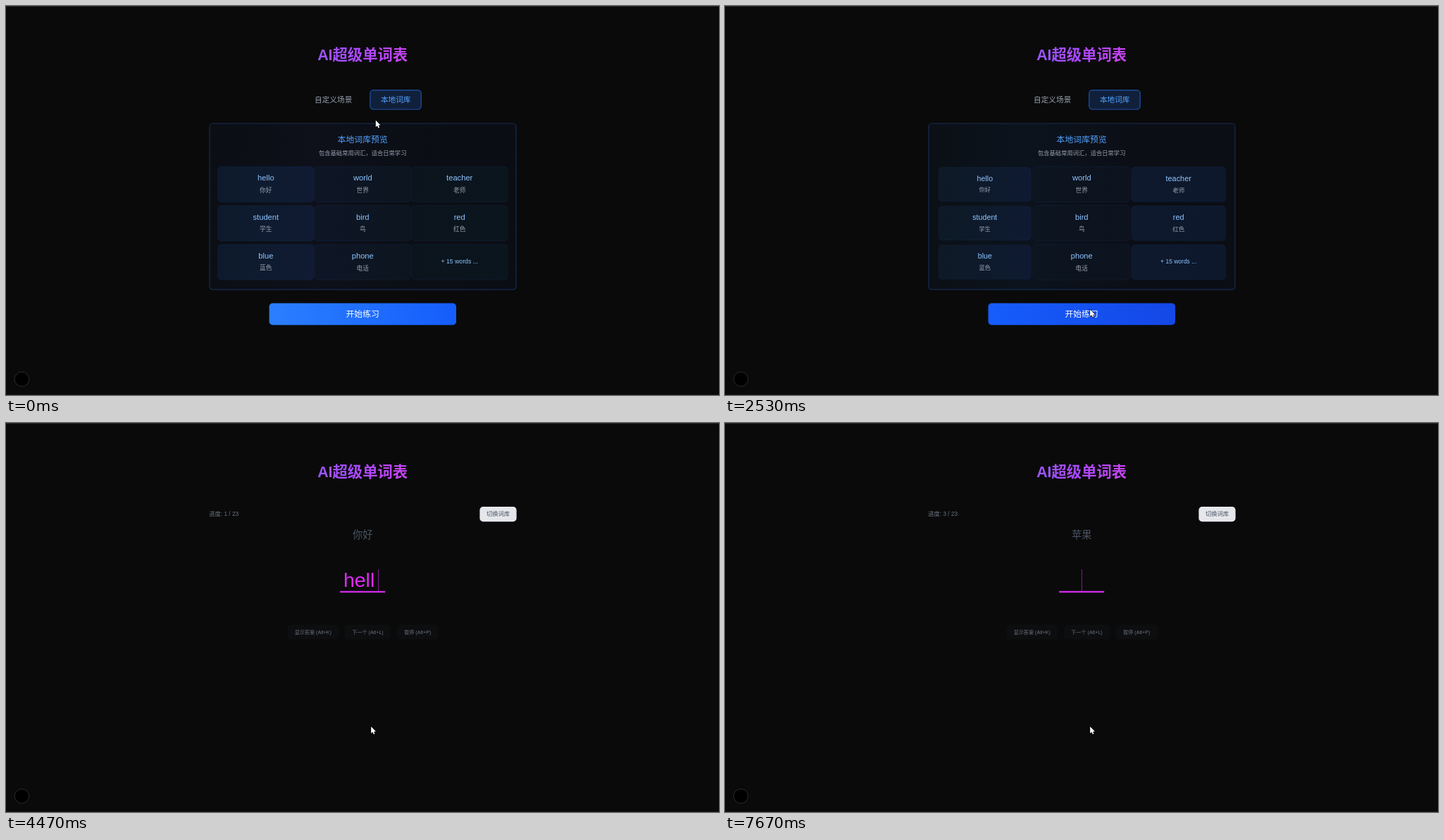
These frames come from a looping animation (1012 by 553 pixels, 8 s). An HTML page with a canvas:

```html
<!DOCTYPE html>
<html lang="zh-CN">
<head>
<meta charset="utf-8">
<title>AI超级单词表</title>
<style>
html, body { margin: 0; width: 100%; height: 100%; overflow: hidden; background: #0a0a0a; }
canvas { display: block; width: 1012px; height: 553px; }
</style>
</head>
<body>
<canvas id="stage"></canvas>
<script>
const W = 1012, H = 553, LOOP = 8000, MID = 506.2;
const FONT = '"Liberation Sans", "Noto Sans CJK SC", "Noto Sans CJK", sans-serif';
const canvas = document.getElementById('stage');
const ctx = canvas.getContext('2d');
const dpr = window.devicePixelRatio || 1;
canvas.width = W * dpr;
canvas.height = H * dpr;

// Rem-based sizes of the page at its zoom level.
const px = n => n * 0.593;
const SM = px(14), MD = px(18), LG = px(20), HUGE = px(48);
const BLUE = '#51a2ff', PALE = '#8ec5ff', GRAY = '#99a1af', DIM = '#6a7282', SLATE = '#4a5565';
const PINK = '#e12afb';

function text(str, x, y, size, color, align = 'center', weight = 400) {
  ctx.font = `${weight} ${size}px ${FONT}`;
  ctx.textAlign = align;
  ctx.fillStyle = color;
  ctx.fillText(str, x, y + size * 0.37);
}

function box(x, y, w, h, r, fill, stroke, line = 1) {
  ctx.beginPath();
  ctx.roundRect(x, y, w, h, r);
  ctx.fillStyle = fill;
  ctx.fill();
  if (stroke) {
    ctx.strokeStyle = stroke;
    ctx.lineWidth = line;
    ctx.stroke();
  }
}

function across(x0, x1, colors) {
  const g = ctx.createLinearGradient(x0, 0, x1, 0);
  colors.forEach((c, i) => g.addColorStop(i / (colors.length - 1), c));
  return g;
}

// Position within a list of key times: index of the segment and progress in it.
function segment(times, t) {
  let i = 0;
  while (i < times.length - 2 && t >= times[i + 1]) i++;
  const k = (t - times[i]) / (times[i + 1] - times[i]);
  return [i, Math.min(1, Math.max(0, k))];
}

const smooth = k => k * k * (3 - 2 * k);

function mix(a, b, k) {
  const part = (c, i) => parseInt(c.slice(i, i + 2), 16);
  return 'rgb(' + [0, 2, 4].map(i => part(a, i) + (part(b, i) - part(a, i)) * k).join(',') + ')';
}

const TINT_TIMES = [0, 1330, 2530];
function tints(keys, t) {
  const [i, k] = segment(TINT_TIMES, t);
  return keys[i].map((c, n) => mix(c, keys[i + 1][n], k));
}

const PANEL = [
  ['0b0e14', '0e101a', '0b0e15', '0b0d14'],
  ['0b1015', '0d1019', '0c0e16', '0c0e15'],
  ['0b1016', '0b131d', '0c0e16', '0c0e15']
];

// Each column breathes with its own period (ms) and lead (ms).
const COLUMNS = [
  { period: 3800, lead: -300, tint: [['0d1a2c', '101b33'], ['0d131f', '0f1a2c'], ['0d1a25', '0f1a32']],
    words: [['hello', '你好'], ['student', '学生'], ['blue', '蓝色']] },
  { period: 2600, lead: 0, tint: [['0e1626', '0c151f'], ['0e1a2d', '0e1a2b'], ['0c141f', '0c131e']],
    words: [['world', '世界'], ['bird', '鸟'], ['phone', '电话']] },
  { period: 3700, lead: 200, tint: [['0b141d', '0b151e'], ['0e1a2a', '0e1a29'], ['0e192d', '0d182c']],
    words: [['teacher', '老师'], ['red', '红色'], ['+ 15 words ...']] }
];

function card(col, row, t) {
  const { period, lead, tint, words } = COLUMNS[col];
  const wave = (1 + Math.cos(2 * Math.PI * (t + lead) / period)) / 2;
  const scale = 1 + 0.05 * wave;
  const [en, zh] = words[row];
  ctx.save();
  ctx.translate(368.8 + col * 137.45, 253.5 + row * 55.3);
  ctx.scale(scale, scale);
  box(-65.2, -24, 130.4, 48, 4.7, across(-65, 65, tints(tint, t)), 'rgba(43,127,255,0.11)', 0.7);
  if (zh) {
    text(en, 0, -8.8, MD, PALE);
    text(zh, 0, 7.8, SM, GRAY);
  } else {
    text(en, 0, -0.8, SM, PALE);
  }
  ctx.restore();
}

const PATH = [[0, 524.8, 162.5], [1330, 521.6, 165.2], [1730, 519.6, 406], [2000, 518.2, 431.6]];
function pointerAt(t) {
  const [i, k] = segment(PATH.map(p => p[0]), t);
  const e = smooth(k), a = PATH[i], b = PATH[i + 1];
  return [a[1] + (b[1] - a[1]) * e, a[2] + (b[2] - a[2]) * e];
}

function pointer(x, y) {
  ctx.save();
  ctx.translate(x, y);
  ctx.beginPath();
  [[0, 0], [0, 9.6], [2.2, 7.7], [3.7, 11], [5.3, 10.3], [3.9, 7.1], [6.8, 6.9]]
    .forEach(p => ctx.lineTo(...p));
  ctx.closePath();
  ctx.strokeStyle = '#000';
  ctx.lineWidth = 1.2;
  ctx.stroke();
  ctx.fillStyle = '#fff';
  ctx.fill();
  ctx.restore();
}

function library(t) {
  text('自定义场景', 464.7, 133, MD, GRAY);
  box(516.8, 119.6, 72.4, 27.4, 4.7, '#11203a', '#1c53a8', 1.2);
  text('本地词库', 553.2, 133, MD, BLUE);

  box(289, 167, 435, 236.2, 4.7, across(289, 724, tints(PANEL, t)), '#142d54', 1.2);
  text('本地词库预览', MID, 189.8, LG, BLUE, 'center', 500);
  text('包含基础常用词汇，适合日常学习', MID, 209, SM, GRAY);
  for (let i = 0; i < 9; i++) card(i % 3, Math.floor(i / 3), t);

  const hover = pointerAt(t)[1] > 422.5;
  const fill = across(374, 639, hover ? ['#155dfc', '#1447e6'] : ['#2b7fff', '#155dfc']);
  box(373.6, 422.5, 265.4, 31, 4.7, fill);
  text('开始练习', MID, 438, LG, '#fff', 'center', 500);
}

// Each round: when it appears, its prompt, the answer and its key times.
const ROUNDS = [
  { start: 2600, prompt: '你好', word: 'hello', keys: [4070, 4200, 4330, 4470, 4670] },
  { start: 5130, prompt: '世界', word: 'world', keys: [6070, 6200, 6330, 6470, 6600] },
  { start: 7130, prompt: '苹果', word: '', keys: [] }
];
const BLINK = 530;

// The caret restarts its blink at focus and at every key press.
function caretOn(t) {
  const marks = [2540, ...ROUNDS.flatMap(r => r.keys)].filter(m => m <= t);
  return Math.floor((t - Math.max(...marks)) / BLINK) % 2 === 0;
}

function answer(typed, t) {
  ctx.font = `400 ${HUGE}px ${FONT}`;
  const width = ctx.measureText(typed).width, pad = 10.2;
  const line = Math.max(64, width + pad);
  text(typed, MID - (width + pad) / 2, 222, HUGE, PINK, 'left');
  ctx.fillStyle = '#cf2be6';
  ctx.fillRect(MID - line / 2, 238.8, line, 2.4);
  if (caretOn(t)) {
    ctx.fillStyle = '#7c1c8b';
    ctx.fillRect(Math.round(MID + width / 2), 208, 1, 31);
  }
}

function practice(t) {
  const n = ROUNDS.filter(r => r.start <= t).length;
  const { prompt, word, keys } = ROUNDS[n - 1];
  text(`进度: ${n} / 23`, 288.2, 129.4, SM, DIM, 'left');
  box(672.4, 119, 52.2, 21.2, 4.7, '#e5e7eb');
  text('切换词库', 698.5, 129.4, SM, SLATE);
  text(prompt, MID, 158.8, px(24), SLATE);
  answer(word.slice(0, keys.filter(k => k <= t).length), t);
  [['显示答案 (Alt+K)', 399.3, 73], ['下一个 (Alt+L)', 481, 65], ['暂停 (Alt+P)', 555, 58.4]]
    .forEach(([label, x, w]) => {
      box(x, 286.8, w, 21, 4.7, '#0d0e0f');
      text(label, x + w / 2, 297, px(12), DIM);
    });
}

function draw(t) {
  ctx.setTransform(dpr, 0, 0, dpr, 0, 0);
  ctx.fillStyle = '#0a0a0a';
  ctx.fillRect(0, 0, W, H);
  ctx.fillStyle = '#2b2b2b';
  ctx.fillRect(0, 0, W, 1);
  ctx.fillStyle = '#1c1313';
  ctx.fillRect(0, H - 1, W, 1);

  text('AI超级单词表', MID, 69, px(36), across(442, 570, ['#9a55ff', '#ad48ff', '#c944f2']), 'center', 700);
  if (t < 2600) library(t); else practice(t);
  box(12.2, 520.2, 20.6, 20.6, 10.3, '#000', '#2c2c2c', 1);
  pointer(...pointerAt(t));
}

function tick(now) {
  draw(now % LOOP);
  requestAnimationFrame(tick);
}
requestAnimationFrame(tick);
</script>
</body>
</html>
```
